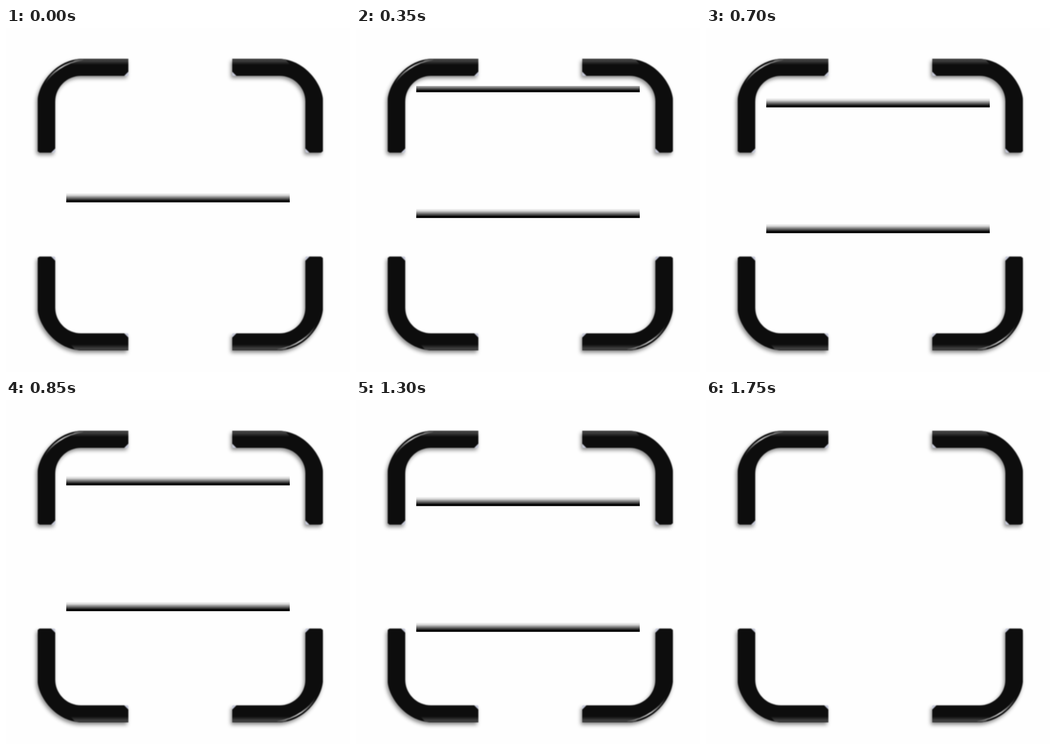
These frames come from a looping animation (748x748 px, 3 s). An HTML page without scripts:

```html
<!DOCTYPE html>
<html lang="en">
<head>
<meta charset="utf-8">
<title>Scan frame</title>
<style>
  html, body { margin: 0; width: 100%; height: 100%; overflow: hidden; background: #fefefe; }
  svg { display: block; width: 100vw; height: 100vh; }
  .corners { filter: blur(.8px) drop-shadow(-3px 5px 4.5px rgba(0, 0, 0, .46)); }

  /* Both bars move together in 50 ms ticks, then vanish. */
  .scan { animation: scan 3s -4ms infinite; }
  @keyframes scan {
    0%       { transform: translateY(85px);  animation-timing-function: steps(7); }
    11.6667% { transform: translateY(119px); animation-timing-function: steps(4); }
    18.3333% { transform: translateY(139px); animation-timing-function: steps(6); }
    28.3333% { transform: translateY(165px); animation-timing-function: steps(4); }
    35%      { transform: translateY(185px); animation-timing-function: steps(1); }
    36.6667% { transform: translateY(190px); animation-timing-function: steps(4); }
    43.3333% { transform: translateY(210px); animation-timing-function: steps(7); }
    55%      { transform: translateY(241px); animation-timing-function: steps(1); }
    56.6667% { transform: translateY(247px); opacity: 1; animation-timing-function: steps(1); }
    58.3333%, 100% { transform: translateY(247px); opacity: 0; animation-timing-function: steps(1); }
  }
</style>
</head>
<body>
<svg viewBox="0 0 748 748">
  <defs>
    <linearGradient id="fade" x2="0" y2="1">
      <stop offset="0" stop-color="#000" stop-opacity="0"/>
      <stop offset=".25" stop-color="#000" stop-opacity=".16"/>
      <stop offset=".84" stop-color="#000"/>
      <stop offset=".95" stop-color="#000"/>
      <stop offset="1" stop-color="#000" stop-opacity=".3"/>
    </linearGradient>
    <linearGradient id="sheen" gradientUnits="userSpaceOnUse" x1="0" y1="67" x2="0" y2="80">
      <stop offset="0" stop-color="#222"/>
      <stop offset=".25" stop-color="#444"/>
      <stop offset="1" stop-color="#0d0d0d"/>
    </linearGradient>
    <linearGradient id="shine" gradientUnits="userSpaceOnUse" x1="85" y1="0" x2="172" y2="0">
      <stop offset="0" stop-color="#fff" stop-opacity="0"/>
      <stop offset=".4" stop-color="#fff" stop-opacity=".8"/>
      <stop offset="1" stop-color="#fff" stop-opacity="0"/>
    </linearGradient>
    <clipPath id="window"><rect x="131" y="126" width="486" height="622"/></clipPath>

    <g id="corner">
      <path d="M266 95V103L264 104H257ZM107 262V269L105 271H98Z" fill="#c6c9d9"/>
      <path d="M69 268V155C73 117 111 68 165 67H266V95L257 104H163A56 56 0 0 0 107 160V262L98 271H73Z" fill="#0d0d0d"/>
      <path d="M150 68.5L165 67H266V80H140Z" fill="url(#sheen)"/>
    </g>
    <path id="glint" d="M84 122C96 99 128 74 168 69" fill="none" stroke="url(#shine)" stroke-width="3"/>
    <rect id="bar" x="131" width="486" height="21" fill="url(#fade)"/>
  </defs>

  <g class="corners">
    <use href="#corner"/>
    <use href="#corner" transform="matrix(-1 0 0 1 758 0)"/>
    <use href="#corner" transform="matrix(1 0 0 -1 0 768)"/>
    <use href="#corner" transform="matrix(-1 0 0 -1 758 768)"/>
    <use href="#glint"/>
    <use href="#glint" transform="matrix(-1 0 0 -1 758 768)"/>
  </g>

  <g clip-path="url(#window)">
    <g class="scan">
      <use href="#bar"/>
      <use href="#bar" y="273.5"/>
    </g>
  </g>
</svg>
</body>
</html>
```
